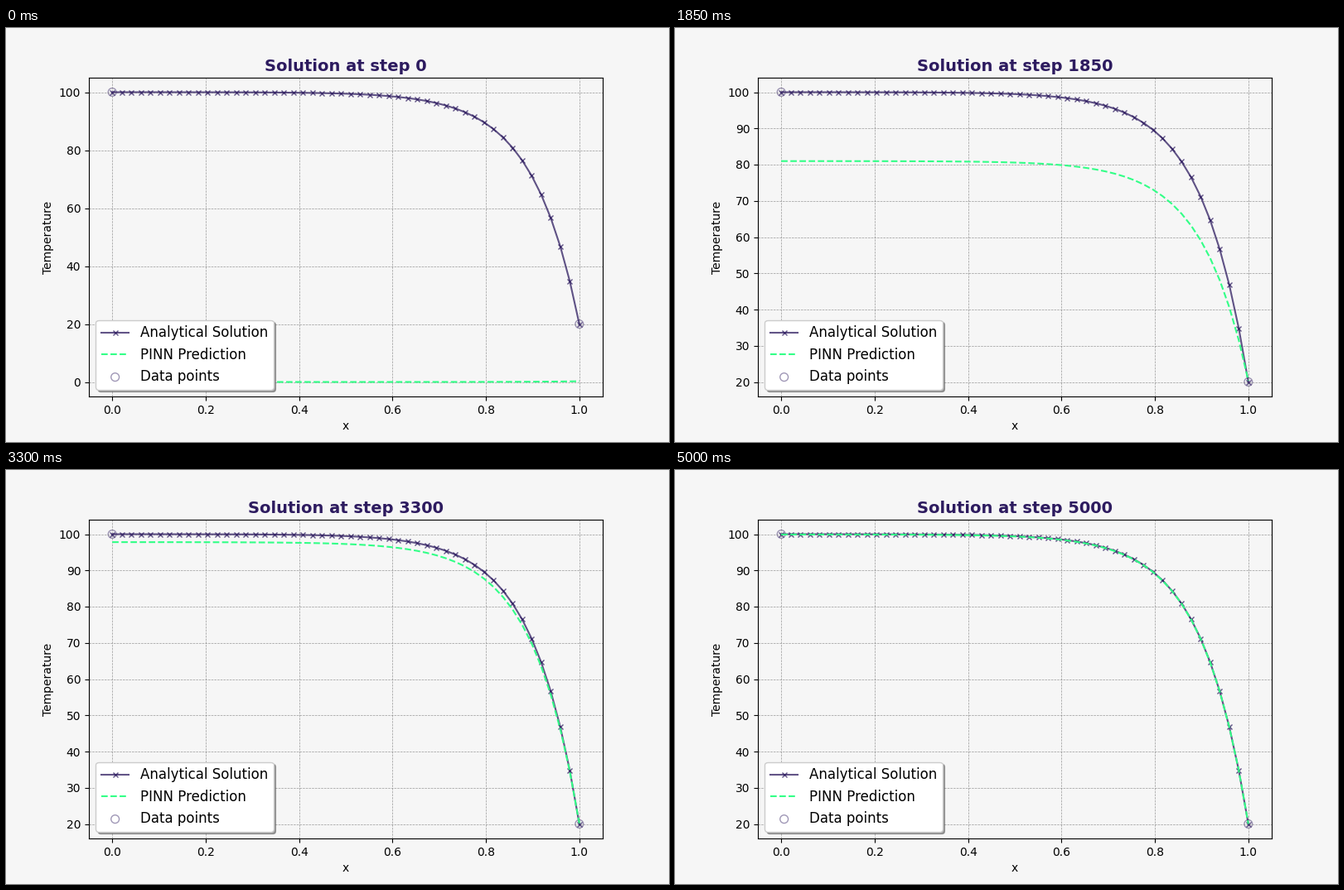
A matplotlib script that plays this animation: 800x500 px, repeating every 5050 ms.

```python
import numpy as np
import matplotlib.pyplot as plt
from matplotlib.animation import FuncAnimation

STEP = 50
FRAMES = 101
T_LEFT, T_RIGHT = 100, 20
INK = "#2d1b5f"
GREEN = "#32ff87"
PAPER = "#f6f6f6"

x = np.linspace(0, 1, 50)
shape = np.expm1(10 * x) / np.expm1(10)
exact = T_LEFT + (T_RIGHT - T_LEFT) * shape


def prediction(step):
    """Boundary values relax towards 100 and 20 as training goes on."""
    s = step / 1000
    rate = np.interp(s, [0, 1.05, 1.85, 2.4, 3.3, 3.9, 5],
                     [0.72, 0.804, 0.897, 0.981, 1.157, 1.238, 1.4])
    left = T_LEFT * (1 - np.exp(-rate * s)) + 0.05 * np.exp(-20 * s)
    settled = 1 - np.exp(-(s / 0.22) ** 1.5)
    right = (T_RIGHT + 0.5 - 0.1 * s) * settled + 0.3 * (1 - settled)
    return left + (right - left) * shape


fig, ax = plt.subplots(figsize=(8, 5), dpi=100, facecolor=PAPER)
ax.set_facecolor(PAPER)
ax.plot(x, exact, color=INK, alpha=0.75, marker="x", markersize=4,
        label="Analytical Solution")
pred_line, = ax.plot(x, prediction(0), "--", color=GREEN,
                     label="PINN Prediction")
ax.scatter([0, 1], [T_LEFT, T_RIGHT], s=50, facecolors="none",
           edgecolors=INK, alpha=0.45, linewidths=1, label="Data points")
ax.set_xlim(-0.05, 1.05)
ax.set_xlabel("x")
ax.set_ylabel("Temperature")
ax.grid(color="gray", linestyle="--", linewidth=0.5, alpha=0.8)
ax.legend(loc="lower left", fontsize=12, shadow=True, fancybox=True)
title = ax.set_title("", fontsize=14, fontweight="bold", color=INK)


def update(frame):
    step = frame * STEP
    pred = prediction(step)
    pred_line.set_ydata(pred)
    low = min(pred.min(), T_RIGHT)
    margin = 0.05 * (T_LEFT - low)
    ax.set_ylim(low - margin, T_LEFT + margin)
    title.set_text(f"Solution at step {step}")
    return pred_line, title


anim = FuncAnimation(fig, update, frames=FRAMES, interval=50,
                     repeat=True, repeat_delay=0, blit=False)
plt.show()
```
